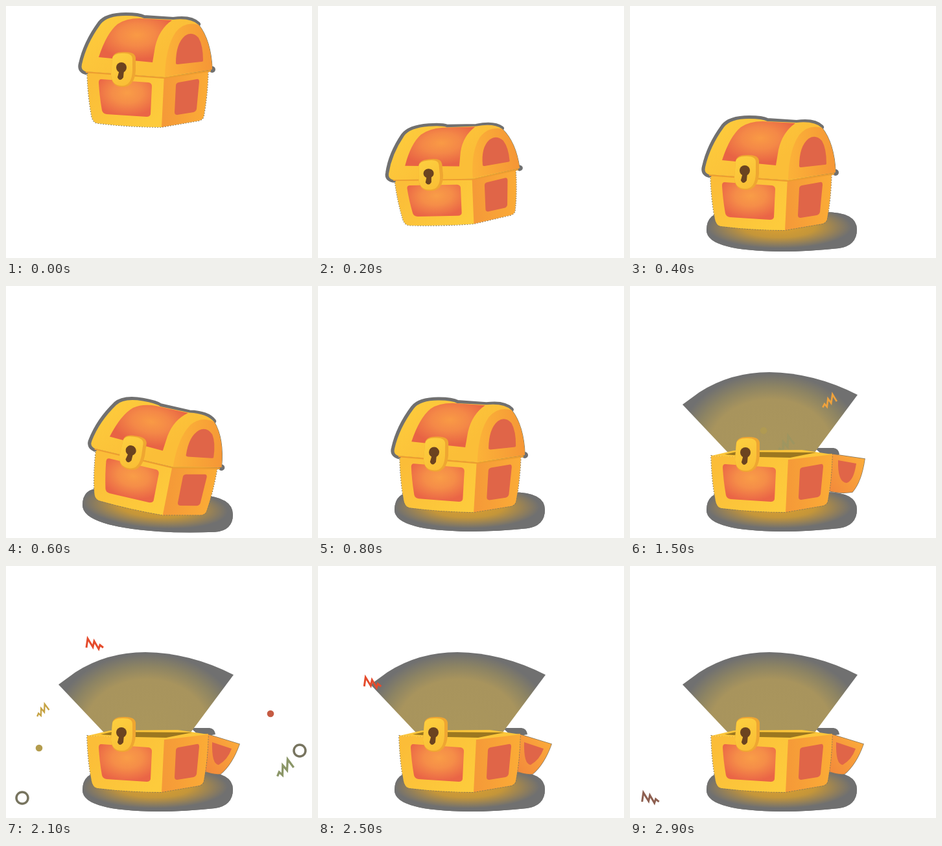
These frames come from a looping animation (472 px wide and 389 px high, 3000 ms). An HTML page with a canvas:

```html
<!DOCTYPE html>
<html lang="en">
<head>
<meta charset="utf-8">
<title>Treasure chest</title>
<style>
html, body { margin: 0; width: 100%; height: 100%; overflow: hidden; background: #fff; }
canvas { display: block; }
</style>
</head>
<body>
<canvas id="stage" width="472" height="389"></canvas>
<script>
const ctx = document.getElementById('stage').getContext('2d');
const LOOP = 3000, STEP = 100, OPEN_AT = 1200, SHADOW_AT = 300;
const GREY = '#707070', GOLD = '#fcc63a';

const shapes = {
  front: 'M125 262 L245 267 L241 349 Q190 349 141 343 Q134 342 132 332 Q126 300 125 262Z',
  side: 'M244 267 L312 259 Q311 300 305 332 Q304 337 298 339 L240 349Z',
  frontPanel: 'M147 275 L220 280 Q225 281 225 286 L223 329 Q222 333 217 333 L155 329 Q149 328 148 323 Q144 300 143 280 Q143 275 147 275Z',
  sidePanel: 'M266 280 L294 275 Q298 274 298 279 L294 321 Q293 325 289 326 L264 330 Q260 330 260 326 L262 285 Q262 281 266 280Z',
  lid: 'M117 252 Q124 220 146 190 Q156 177 185 177 Q205 177 213 181 L258 183 Q285 180 297 191 Q316 215 318 260 L245 272 L122 263 Q115 260 117 252Z',
  lidEdge: 'M123 264 Q113 261 116 251 Q123 219 145 189 Q155 176 185 176 Q205 176 213 180 L258 183 Q285 179 296 190',
  lidPanel: 'M143 241 Q155 204 172 190 Q185 181 206 181 L256 184 Q236 198 230 225 L226 249Z',
  lidSide: 'M245 271 Q246 225 262 202 Q276 185 297 191 Q316 215 318 260Z',
  lidSidePanel: 'M262 250 Q262 220 276 208 Q287 200 297 211 Q304 223 304 246 Q304 248 301 248 L265 252 Q262 252 262 250Z',
  lidSeam: 'M123 264 L245 273 L316 262',
  lock: 'M164 242 Q166 233 181 233 Q200 232 200 243 L200 262 Q198 287 180 287 Q163 287 162 269Z',
  lockFace: 'M164 243 Q166 235 179 235 Q195 234 195 244 L195 262 Q194 285 179 285 Q163 285 162 268Z',
  keyStem: 'M176 261 L181 261 L180 272 Q176 278 173 272Z',
  rim: 'M126 262 L160 254 L265 253 L312 260 L245 268Z',
  inside: 'M146 260 L164 256 L287 257 L247 265 L200 264Z',
  beam: 'M150 256 L81 183 L107 164 Q155 133 215 133 Q285 134 351 168 L284 258Z',
  shadow: 'M118 346 Q118 318 150 318 L300 318 Q350 318 350 345 Q350 370 322 374 Q275 379 235 379 Q175 378 150 371 Q118 363 118 346Z',
  openShade: 'M285 250 L314 250 Q322 251 323 260 L300 264Z',
  squiggle: 'M-13 6 L-11 -8 L-3 5 L-1 -4 L6 8 L8 2 L13 6'
};
for (const name in shapes) shapes[name] = new Path2D(shapes[name]);

// time, position of the body's upper left corner, tilt, lean, height
const poses = [
  [0, 125, 100, 0, 0, 1],
  [100, 122, 190, -.04, .04, 1],
  [200, 118, 267, -.078, .085, .9],
  [300, 117, 263, -.08, .08, .95],
  [400, 124, 259, 0, 0, 1],
  [500, 134, 253, .1, -.08, .98],
  [600, 139, 250, .166, -.14, .97],
  [700, 134, 254, .1, -.08, .98],
  [800, 126, 261, .01, -.01, 1],
  [900, 122, 264, -.04, .03, .98],
  [1000, 124, 263, -.01, .01, 1],
  [1100, 125, 262, 0, 0, 1]
];

// start and end in seconds; (x, y) is the place at 2.1 s
const confetti = [
  { kind: 'squiggle', color: '#f0a23c', start: 1.3, end: 1.85, x0: 225, x: 549, y: 219, g: 1100, angle: -.4, scale: .9, mirror: true },
  { kind: 'dot', color: '#b39c4d', start: 1.4, end: 2.4, x0: 232, x: 51, y: 281, g: 1100 },
  { kind: 'squiggle', color: '#8b9668', start: 1.47, end: 2.25, x0: 228, x: 428, y: 312, g: 1100, angle: -.5, scale: 1.1, mirror: true },
  { kind: 'squiggle', color: '#e54b2c', late: '#8d5f50', start: 1.5, end: 3, x0: 216, x: 137, y: 120, g: 739, angle: 0, scale: 1 },
  { kind: 'squiggle', color: '#c6a344', start: 1.51, end: 2.35, x0: 215, x: 55, y: 223, g: 1100, angle: -.5, scale: .8, mirror: true },
  { kind: 'ring', color: '#77745f', start: 1.51, end: 2.35, x0: 205, x: 25, y: 358, g: 1100 },
  { kind: 'dot', color: '#c55b43', start: 1.51, end: 2.25, x0: 235, x: 408, y: 228, g: 1100 },
  { kind: 'ring', color: '#77745f', start: 1.51, end: 2.15, x0: 240, x: 453, y: 285, g: 1100 }
];

const clamp = v => Math.max(0, Math.min(1, v));
const mix = (a, b, k) => a + (b - a) * k;

function fill(name, paint) {
  ctx.fillStyle = paint;
  ctx.fill(typeof name === 'string' ? shapes[name] : name);
}

function stroke(name, color, width) {
  ctx.strokeStyle = color;
  ctx.lineWidth = width;
  ctx.stroke(shapes[name]);
}

function circle(x, y, r) {
  ctx.beginPath();
  ctx.arc(x, y, r, 0, Math.PI * 2);
}

function radial(x, y, r, ...stops) {
  const g = ctx.createRadialGradient(x, y, 0, x, y, r);
  stops.forEach(([at, color]) => g.addColorStop(at, color));
  return g;
}

function linear(x1, y1, x2, y2, from, to) {
  const g = ctx.createLinearGradient(x1, y1, x2, y2);
  g.addColorStop(0, from);
  g.addColorStop(1, to);
  return g;
}

function poseAt(t) {
  const i = poses.findIndex(p => p[0] >= t);
  if (i < 0) return poses[poses.length - 1];
  if (i === 0) return poses[0];
  const a = poses[i - 1], b = poses[i];
  const k = (t - a[0]) / (b[0] - a[0]);
  return a.map((v, n) => mix(v, b[n], k));
}

// Elliptical glow clipped to a shape
function glow(name, x, y, rx, ry, ...stops) {
  ctx.save();
  ctx.clip(shapes[name]);
  ctx.translate(x, y);
  ctx.scale(1, ry / rx);
  ctx.fillStyle = radial(0, 0, rx, ...stops);
  ctx.fillRect(-400, -800, 800, 1600);
  ctx.restore();
}

function drawShadow(tilt) {
  const slope = tilt * .4;
  ctx.save();
  ctx.transform(1, slope, 0, 1, 0, -slope * 234);
  fill('shadow', GREY);
  glow('shadow', 230, 341, 112, 33, [0, '#dca030'], [.5, '#c59639'], [1, GREY]);
  ctx.restore();
}

function drawBody() {
  ctx.setLineDash([2, 2]);
  stroke('front', '#77705c', 1.5);
  stroke('side', '#77705c', 1.5);
  ctx.setLineDash([]);
  fill('front', linear(140, 270, 220, 350, '#fbbd38', '#fdcb3c'));
  fill('side', linear(245, 300, 309, 300, '#f59a38', '#fbab36'));
  glow('frontPanel', 187, 296, 52, 36, [0, '#f99d47'], [.45, '#f58d48'], [1, '#ea6546']);
  fill('sidePanel', '#e06548');
}

function drawLid() {
  ctx.lineCap = 'round';
  stroke('lid', '#77705c', 1.5);
  stroke('lidEdge', GREY, 8);
  ctx.lineCap = 'butt';
  circle(318, 260, 5);
  ctx.fillStyle = GREY;
  ctx.fill();
  stroke('lidSeam', '#ed9d30', 2.5);
  fill('lid', linear(130, 190, 200, 270, '#fdcb3c', '#fbbe38'));
  glow('lidPanel', 202, 207, 64, 38, [0, '#f99a45'], [.45, '#f48847'], [1, '#e86344']);
  fill('lidSide', linear(248, 230, 318, 230, '#fbb138', '#f59636'));
  fill('lidSidePanel', '#e06548');
}

function drawLock() {
  fill('lock', '#efa631');
  fill('lockFace', linear(165, 235, 195, 285, '#fdcf3f', '#f9bd35'));
  ctx.fillStyle = '#6b4320';
  circle(178, 257, 8);
  ctx.fill();
  fill('keyStem', '#6b4320');
  stroke('keyStem', '#6b4320', 2);
}

function drawBeam(t) {
  const growing = t < 1300;
  ctx.save();
  ctx.translate(217, 256);
  ctx.scale(growing ? .97 : 1, growing ? .99 : 1);
  ctx.translate(-217, -256);
  glow('beam', 217, 250, 150, 119, [0, '#aa965c'], [.63, '#a8945d'], [.8, '#8d8463'], [.97, GREY], [1, GREY]);
  ctx.restore();
}

function drawOpenLid(t) {
  const k = clamp((t - 1500) / 200);
  const p = (a, b) => mix(a, b, k);
  fill('openShade', GREY);
  const face = new Path2D();
  face.moveTo(308, 259);
  face.lineTo(p(362, 360), p(267, 275));
  face.quadraticCurveTo(p(357, 349), p(302, 306), p(343, 331), p(318, 321));
  face.quadraticCurveTo(p(326, 318), p(321, 322), 305, 316);
  face.closePath();
  ctx.strokeStyle = '#85765c';
  ctx.lineWidth = 1.5;
  ctx.stroke(face);
  fill(face, linear(306, 310, 360, 270, '#f38b3b', '#fbab3b'));
  const panel = new Path2D();
  panel.moveTo(p(321, 318), p(269, 272));
  panel.lineTo(p(349, 348), p(274, 282));
  panel.quadraticCurveTo(p(345, 342), p(301, 299), p(334, 328), p(304, 307));
  panel.quadraticCurveTo(p(320, 317), p(303, 306), p(321, 318), p(269, 272));
  fill(panel, '#e06548');
}

function drawConfetti(sec) {
  for (const c of confetti) {
    const age = sec - c.start;
    if (age <= .005 || sec >= c.end) continue;
    const y0 = 252, span = 2.1 - c.start;
    const vy = (c.y - y0) / span - c.g * span / 2;
    const x = mix(c.x0, c.x, age / span);
    const y = y0 + vy * age + c.g * age * age / 2;
    const color = c.late && sec > 2.6 ? c.late : c.color;
    ctx.save();
    ctx.globalAlpha = clamp(.25 + age * 4);
    ctx.translate(x, y);
    if (c.kind === 'squiggle') {
      ctx.rotate(c.angle);
      ctx.scale(c.mirror ? -c.scale : c.scale, c.scale);
      stroke('squiggle', color, 3);
    } else if (c.kind === 'ring') {
      circle(0, 0, 9);
      ctx.strokeStyle = color;
      ctx.lineWidth = 3.5;
      ctx.stroke();
    } else {
      circle(0, 0, 5.3);
      ctx.fillStyle = color;
      ctx.fill();
    }
    ctx.restore();
  }
}

function draw(t) {
  ctx.fillStyle = '#fff';
  ctx.fillRect(0, 0, 472, 389);
  const [, x, y, tilt, lean, height] = poseAt(t);
  const open = t >= OPEN_AT;
  if (t >= SHADOW_AT) drawShadow(tilt);
  if (open) {
    drawOpenLid(t);
    drawBeam(t);
    drawConfetti(t / 1000);
  }
  ctx.save();
  ctx.transform(1, tilt, lean, height, x, y);
  ctx.translate(-125, -262);
  drawBody();
  if (open) {
    fill('rim', GOLD);
    fill('inside', '#9b7720');
  } else {
    drawLid();
  }
  drawLock();
  ctx.restore();
}

const began = performance.now();
function frame() {
  const t = (performance.now() - began) % LOOP;
  draw(Math.floor(t / STEP) * STEP);
  requestAnimationFrame(frame);
}
frame();
</script>
</body>
</html>
```
